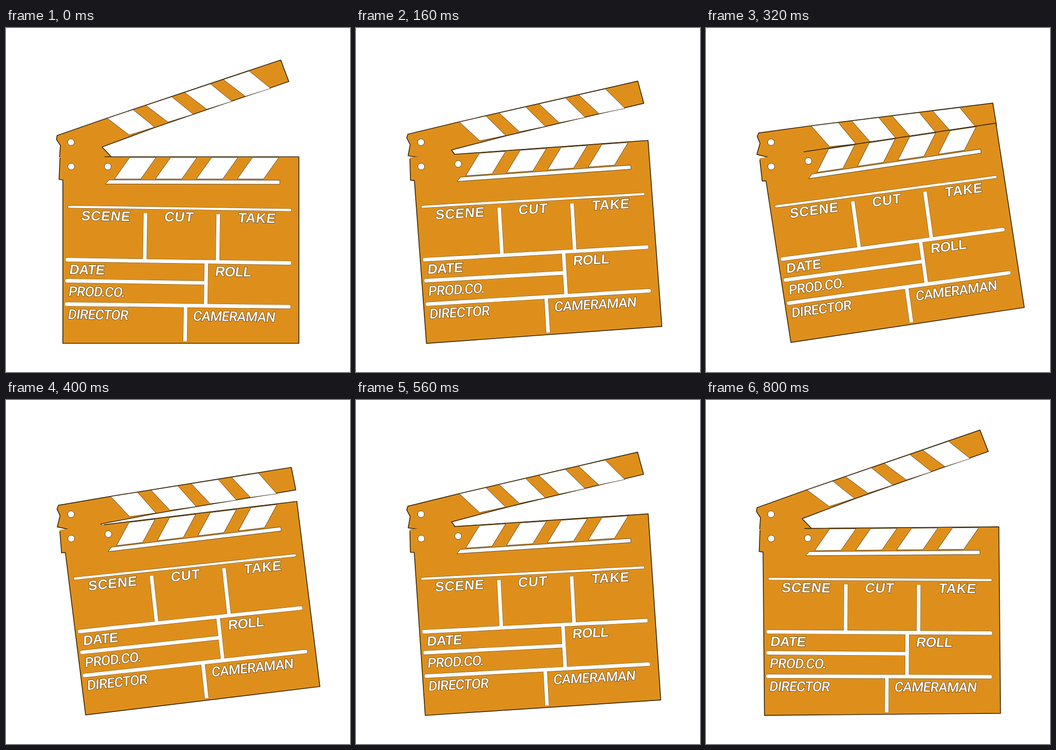
These frames come from a looping animation (720 px wide and 720 px high, 1.2 s). An HTML page without scripts:

```html
<!DOCTYPE html>
<html lang="en">
<head>
<meta charset="utf-8">
<title>Clapperboard</title>
<style>
  html, body { margin: 0; width: 100%; height: 100%; overflow: hidden; background: #fff; }
  svg {
    display: block; width: 100%; height: 100%;
    --tilt: 0deg; --shut: 0deg;
    animation: clap 1.2s step-end infinite;
  }

  /* --tilt swings the board up, --shut swings the arm down */
  @keyframes clap {
    0%     { --tilt: 0deg;    --shut: 0deg; }
    6.66%  { --tilt: 1.8deg;  --shut: 2.7deg; }
    13.33% { --tilt: 4.12deg; --shut: 5.66deg; }
    20%    { --tilt: 6.86deg; --shut: 8.54deg; }
    26.66% { --tilt: 8.5deg;  --shut: 11.4deg; }
    33.33% { --tilt: 6.9deg;  --shut: 9.4deg; }
    40%    { --tilt: 5.27deg; --shut: 7.42deg; }
    46.66% { --tilt: 3.75deg; --shut: 5.4deg; }
    53.33% { --tilt: 2.05deg; --shut: 3.5deg; }
    60%    { --tilt: 1.2deg;  --shut: 1.4deg; }
    66.66%, 100% { --tilt: .5deg; --shut: -.54deg; }
  }

  .arm { transform-origin: 136px 239px; transform: rotate(var(--shut)); }
  .board {
    transform-origin: 136px 276px;
    transform: rotate(calc(var(--tilt) * -1)) skewX(calc(var(--tilt) * .03));
  }

  .wood { fill: #de8f1b; }
  .edge { stroke: #35240a; stroke-width: 1.7; stroke-linejoin: round; }
  .line { fill: none; }
  .white { fill: #fff; stroke: #35240a; stroke-width: .8; }
  .rules { fill: none; stroke-linecap: round; }
  .dark { stroke: #6b4510; stroke-width: 9; }
  .light { stroke: #fff; stroke-width: 7.8; }
  .thin.dark { stroke-width: 6; }
  .thin.light { stroke-width: 4.8; }

  text {
    font: bold 28.5px "Liberation Sans", Arial, sans-serif;
    fill: #fff; stroke: #35240a; stroke-width: 1.3; paint-order: stroke;
    transform-box: fill-box; transform-origin: 0 80%; transform: skewX(-7deg);
  }
  .wide { letter-spacing: 1px; }
  .mid { letter-spacing: -.5px; }
  .slim text { font: 500 28.5px Roboto, sans-serif; letter-spacing: -.9px; }
</style>
</head>
<body>
<svg viewBox="0 0 720 720">
  <defs>
    <path id="armStripe" d="M212 189L266 171L311 207.5L258 224Z"/>
    <path id="boardStripe" d="M259 271L314 271L282 316L227 316Z"/>
    <path id="rules" d="M130 485H595M130 529H418M130 578L595 576.5M421 485V577"/>
    <path id="bars" d="M292 385V485M444.5 385V485M379 578V652"/>
    <path id="topRule" d="M132 374H595"/>
  </defs>

  <g class="arm">
    <path class="wood edge" d="M107 225L212 188.500L575 67L592 112L311 208.500L201 249L235 285H150L135 271L112 270L114 246L105.500 233Z"/>
    <g class="white">
      <use href="#armStripe"/>
      <use href="#armStripe" x="81" y="-27"/>
      <use href="#armStripe" x="162" y="-54"/>
      <use href="#armStripe" x="243" y="-81"/>
      <circle cx="136" cy="239" r="7"/>
    </g>
  </g>

  <g class="board">
    <path class="wood" d="M113 269H613V660H119V318L111 317Z"/>
    <path class="edge line" d="M206 269.500H613V660H119V318L111 317L113 272"/>
    <g class="white">
      <use href="#boardStripe"/>
      <use href="#boardStripe" x="85.700"/>
      <use href="#boardStripe" x="171.400"/>
      <use href="#boardStripe" x="257"/>
      <path d="M216 318L573 318.500V327L208 326.500Z"/>
      <circle cx="213" cy="290" r="7"/>
    </g>

    <g transform="rotate(.86 130 374)">
      <g class="rules">
        <use class="thin dark" href="#topRule"/>
        <use class="dark" href="#rules"/>
        <use class="dark" href="#bars" stroke-linecap="butt"/>
        <use class="thin light" href="#topRule"/>
        <use class="light" href="#rules"/>
        <use class="light" href="#bars" stroke-linecap="butt"/>
      </g>
      <g class="wide">
        <text x="157" y="402">SCENE</text>
        <text x="331" y="401.500">CUT</text>
        <text x="485" y="401.500">TAKE</text>
      </g>
      <g class="mid">
        <text x="134" y="515">DATE</text>
        <text x="439" y="514.500">ROLL</text>
      </g>
      <g class="slim">
        <text x="132.500" y="561">PROD.CO.</text>
        <text x="132" y="609">DIRECTOR</text>
        <text x="394" y="608.500">CAMERAMAN</text>
      </g>
    </g>
  </g>

  <circle class="white" cx="136.500" cy="290" r="7"/>
</svg>
</body>
</html>
```
